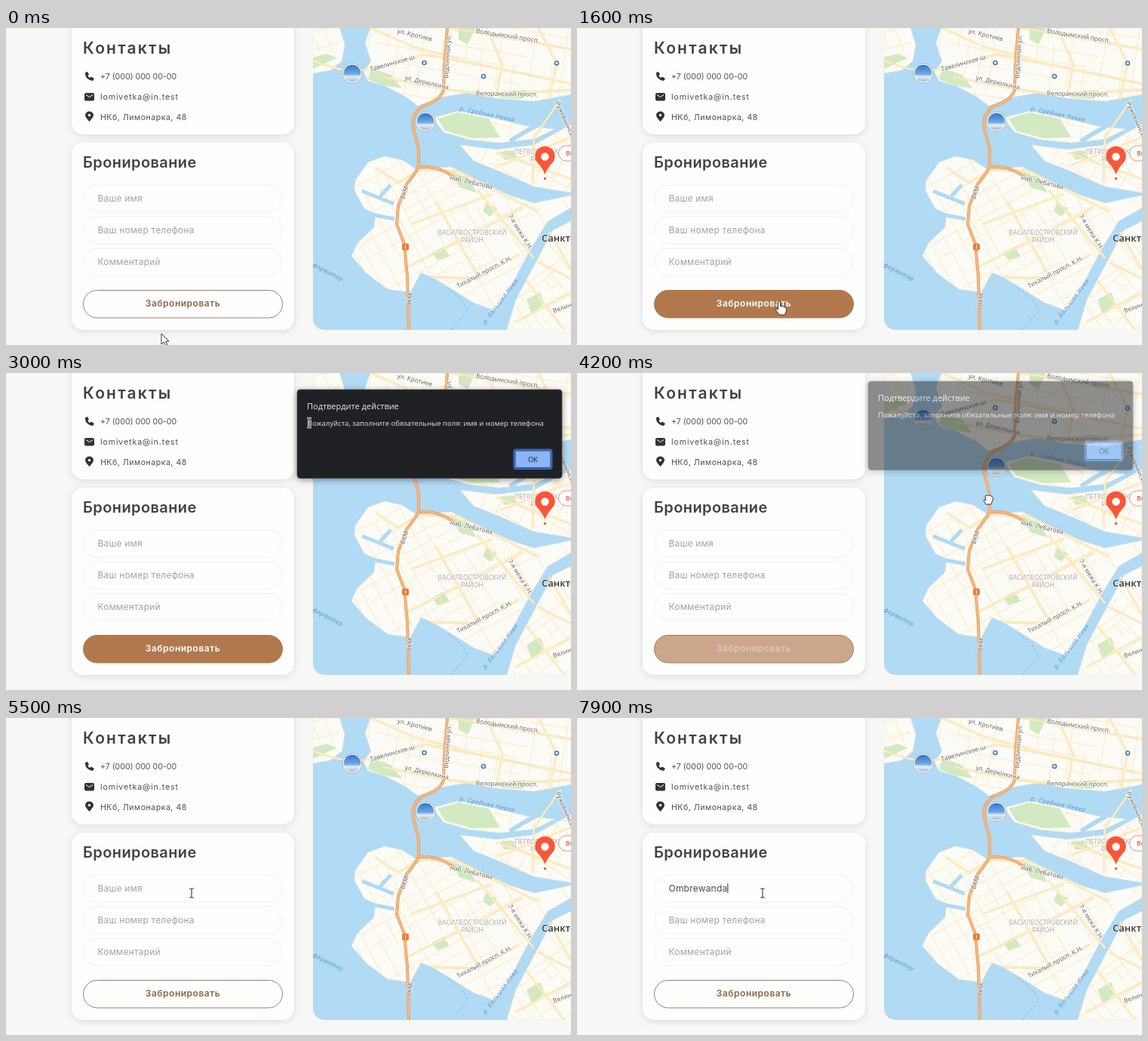
These frames come from a looping animation (749 by 420 pixels, 8000 ms). An HTML page:

```html
<!DOCTYPE html>
<html lang="ru">
<head>
<meta charset="utf-8">
<title>Бронирование</title>
<style>
html, body { margin: 0; width: 100%; height: 100%; overflow: hidden; background: #f7f7f6 }
svg { display: block; width: 749px; height: 420px; font-family: Inter, sans-serif }
.card { fill: #fefefe; filter: drop-shadow(0 2px 5px #0000001c) }
.head { font-size: 20px; font-weight: 600; fill: #444144 }
.info { font-size: 10.6px; fill: #504d50 }
.hint { font-size: 12px; fill: #a5a3a2; letter-spacing: .2px }
.field { fill: #fefefe; stroke: #f1f0f0 }
.map text, .dialog text { font-family: "Open Sans", "Noto Sans", sans-serif }
.map text { font-size: 8.3px; fill: #5f5d59; text-anchor: middle; paint-order: stroke; stroke: #fffc; stroke-width: 1.6px }
.map .river { fill: #5b94c8; font-style: italic; stroke: none; letter-spacing: .5px }
.map .area { fill: #aaa6a6; font-size: 8.5px }
.map .city { fill: #333; font-size: 13px; font-weight: 600; text-anchor: start }
.map .tag { fill: #e8563a; font-weight: 600; text-anchor: start; stroke: none }
</style>
</head>
<body>
<svg viewBox="0 0 749 420">
  <defs>
    <clipPath id="frame"><rect x="407" y="-30" width="380" height="430" rx="15"/></clipPath>
    <linearGradient id="sky" x2="0" y2="1">
      <stop offset="0" stop-color="#2f74cd"/><stop offset=".55" stop-color="#75aae5"/>
      <stop offset=".7" stop-color="#e6edf2"/><stop offset="1" stop-color="#9db8cd"/>
    </linearGradient>
    <g id="photo"><circle r="13" fill="#fff" stroke="#a9b5c0"/><circle r="11.3" fill="url(#sky)"/></g>
    <g id="arrow"><path d="M0 0V14L3.3 11 5.6 16 8 15 5.7 10H10Z" fill="#fff" stroke="#333"/></g>
    <g id="beam"><path d="M-3-6H-1L0-5 1-6H3M0-5V5M-3 6H-1L0 5 1 6H3" fill="none" stroke="#fff" stroke-width="2.6"/>
      <path d="M-3-6H-1L0-5 1-6H3M0-5V5M-3 6H-1L0 5 1 6H3" fill="none" stroke="#444" stroke-width="1.2"/></g>
    <g id="hand"><path d="M-1.5 0Q0-2 1.5 0V6Q3 4.500 4.500 6 6 5.500 7 7 9 6.500 9.500 9V12L7.500 17H0L-5 10Q-4.500 8-1.500 10Z" fill="#fff" stroke="#333"/></g>
    <g id="grab"><path d="M-3 7L-6 2Q-5 0-3 2L-4-4Q-2.500-6-1 -4 0-7 2-4.500 4-6 4.500-3 7-4 6.500 0L4 7Z" fill="#fff" stroke="#333"/></g>
  </defs>

  <g>
    <rect class="card" x="87" y="-30" width="295" height="171" rx="15"/>
    <rect class="card" x="87" y="152" width="295" height="248" rx="15"/>
    <text class="head" x="102" y="34" style="font-size:21px" letter-spacing="2.2">Контакты</text>
    <text class="head" x="102" y="185" letter-spacing=".4">Бронирование</text>
    <path d="M105 59Q104 68 115 70L117 67 113 64.500 111 66Q109 65 108.500 63L110 61.500 108 58Z" fill="#343235"/>
    <rect x="104" y="86" width="13" height="10.500" rx="2" fill="#343235"/>
    <path d="M106 88.500L110.500 91.500 115 88.500" fill="none" stroke="#fff"/>
    <path d="M110.500 124Q105 118 105 115.500A5.500 5 0 0 1 116 115.500Q116 118 110.500 124Z" fill="#343235"/>
    <circle cx="110.500" cy="115.500" r="1.700" fill="#fff"/>
    <text class="info" x="125" y="68">+7 (000) 000 00-00</text>
    <text class="info" x="125" y="95" letter-spacing=".9">lomivetka@in.test</text>
    <text class="info" x="125" y="121.500" letter-spacing=".5">НКб, Лимонарка, 48</text>
    <rect class="field" x="103" y="208" width="263" height="36" rx="18"/>
    <rect class="field" x="103" y="250" width="263" height="36" rx="18"/>
    <rect class="field" x="103" y="292" width="263" height="36" rx="18"/>
    <text class="hint" id="name" x="121.500" y="229.500"></text>
    <path id="caret" stroke="#333"/>
    <text class="hint" x="121.500" y="271.500">Ваш номер телефона</text>
    <text class="hint" x="121.500" y="313.500">Комментарий</text>
    <rect id="button" x="102.500" y="347.500" width="264" height="36.500" rx="18.200"/>
    <text id="label" x="234.500" y="369" text-anchor="middle" font-size="12" letter-spacing=".5" font-weight="600">Забронировать</text>
  </g>

  <g class="map" clip-path="url(#frame)">
    <rect x="407" y="0" width="342" height="400" fill="#b1daf4"/>
    <g id="land"></g>
    <g id="roads" fill="none" stroke-linejoin="round"></g>
    <path d="M585 345Q606 358 612 375L590 400" fill="none" stroke="#7eb0d5" stroke-dasharray="3 3"/>
    <rect x="525" y="285.500" width="9" height="9" rx="2" fill="#f07b32"/>
    <path d="M529.500 287.500V292.500" stroke="#fff"/>
    <g id="names"></g>
    <g fill="#fff" stroke="#487fbb" stroke-width="1.700">
      <circle cx="554.500" cy="46" r="2.500"/><circle cx="633" cy="64" r="2.500"/><circle cx="730" cy="46.500" r="2.500"/>
    </g>
    <use href="#photo" x="459" y="60"/>
    <use href="#photo" x="556" y="124"/>
    <path d="M714.500 194Q711 185 705 179A13.200 13.200 0 1 1 724 179Q718 185 714.500 194Z" fill="#fa5538"/>
    <circle cx="714.500" cy="170.500" r="5.200" fill="#fff"/>
    <circle cx="714.500" cy="199.500" r="2.200" fill="#e5603d" stroke="#fff"/>
    <rect x="732.500" y="156" width="60" height="20" rx="10" fill="#fff" stroke="#e9917c"/>
    <text class="tag" x="742" y="169">Во</text>
  </g>

  <g class="dialog" id="dialog">
    <rect x="386" y="22" width="351" height="117.500" rx="4" fill="#202124" stroke="#45474a" stroke-width=".7" style="filter:drop-shadow(0 2px 4px #0006)"/>
    <text x="399" y="48" font-size="11" fill="#e8eaed">Подтвердите действие</text>
    <text x="399" y="70" font-size="9.540" fill="#e3e5e8">Пожалуйста, заполните обязательные поля: имя и номер телефона</text>
    <rect x="673.500" y="101.500" width="50" height="25.500" rx="3" fill="#8ab4f8" stroke="#346bc5" stroke-width="2"/>
    <rect x="675" y="103" width="47" height="22.500" rx="2" fill="none" stroke="#202124" stroke-width=".8"/>
    <text x="698.500" y="117.500" font-size="9.500" fill="#202124" text-anchor="middle">ОК</text>
  </g>
  <use id="cursor"/>
</svg>
<script>
const $ = id => document.getElementById(id);
const add = (id, html) => $(id).insertAdjacentHTML('beforeend', html);

// Land masses, each with a slightly irregular street grid
let seed = 7;
const rnd = () => (seed = seed * 16807 % 2147483647) / 2147483647;
function isle(id, d, x, y, size, angle, gap) {
  let grid = '';
  for (let p = -size; p < size; p += gap * (.6 + rnd() * .8)) {
    const a = -size * rnd(), b = size * rnd(), bend = rnd() * 8 - 4;
    grid += `M${a} ${p}Q0 ${p + bend} ${b} ${p}`;
  }
  for (let p = -size; p < size; p += gap * (.6 + rnd() * .8))
    grid += `M${p} ${-size * rnd()}L${p + rnd() * 8} ${size * rnd()}`;
  add('land', `<clipPath id="${id}"><path d="${d}"/></clipPath>
    <path d="${d}" fill="#fdfbf6" stroke="#e9ebe4" stroke-width=".7"/>
    <g clip-path="url(#${id})"><path d="${grid}" transform="translate(${x} ${y}) rotate(${angle})"
      fill="none" stroke="#fbeecb" stroke-width="1.2"/></g>`);
}
isle('west', 'M407 0H442L449 22 445 44 430 56 407 60Z', 424, 22, 34, -15, 18);
isle('north', 'M483 0L476 20 484 44 474 58 480 70 503 77 530 91 546 103 575 92 610 86 650 93 700 97 749 88V0Z', 615, 45, 140, 10, 20);
isle('park', 'M566 119L600 110 640 118 690 130 727 134 700 147 655 152 615 148 580 138Z', 640, 130, 90, 15, 26);
isle('east', 'M602 155L650 161 700 155 749 128V218L700 210 655 190 620 176Z', 690, 175, 80, 30, 17);
isle('harbour', 'M502 170L525 175 545 188 590 184 632 205 668 222 700 232 749 222V238L718 256 696 292 682 318 668 345 648 374 620 364 590 345 565 330 550 324 536 350 506 346 478 325 458 302 466 285 488 264 490 246 475 239 462 215 463 202 480 178Z', 605, 260, 145, -28, 18);
isle('south', 'M749 256L725 268 708 300 692 330 676 360 664 400H749Z', 715, 335, 75, -35, 16);

const parks = [
  'M407 39L426 34 438 40 407 54Z', 'M484 53L510 62 525 80 500 76 480 68Z', 'M600 0H622L612 22 600 15Z',
  'M572 120L600 112 640 120 655 145 618 146 582 136Z', 'M650 85L690 82 684 94 655 92Z',
  'M655 164L672 162 678 172 661 175Z', 'M590 190L612 198 624 218 601 211Z', 'M636 232L651 239 642 250 632 243Z',
  'M690 360L708 350 714 365 697 378Z', 'M565 298L580 290 588 302 572 308Z'];
add('land', `<path d="${parks.join('')}" fill="#d2e9c1"/>
  <g fill="none" stroke="#b1daf4"><path d="M472 216L514 233M496 223L510 208M484 247L515 253" stroke-width="5"/>
  <path d="M668 150Q698 130 749 107" stroke-width="6"/></g>`);

const road = (d, color, w) => add('roads', `<path d="${d}" stroke="${color}" stroke-width="${w}"/>`);
const yellow = 'M407 43Q450 62 484 54T555 35L640 51 749 74M484 0L540 25 600 40M500 65L580 81 640 88 749 82'
  + 'M590 0L749 28M637 0L658 48 650 90M706 0L730 47 720 95M548 188L600 190 640 211 705 243M490 185L520 205 548 188'
  + 'M533 316L600 283 685 238M565 330L625 332 680 300M625 215L700 305M570 230L625 327M537 260L645 220M650 165L749 200'
  + 'M735 95L700 145 698 205M655 182L749 145M705 310L749 332M675 390L749 350M720 270L749 320M690 335L740 400';
road(yellow, '#f7dda6', 2.8);
road(yellow, '#fff0c4', 1.7);
const highway = 'M585 0L581 50 580 83Q575 96 552 104 535 116 541 137L547 160V184Q541 195 531 207L520 236 518 260 528 286 532 330 534 400M547 184Q575 182 595 199';
road(highway, '#e39a61', 4);
road(highway, '#f8b77c', 2.6);

const name = (s, x, y, turn = 0, cls = '') =>
  add('names', `<text class="${cls}" transform="translate(${x} ${y}) rotate(${turn})" y="3">${s}</text>`);
name('ул. Кротиев', 542, 9, 14);
name('Володымский просп.', 665, 10, 9);
name('Тавелинское ш.', 513, 46, -16);
name('ул. Дерюлкина', 558, 72, 13);
name('Велоранский просп.', 664, 87, 1);
name('Ведлинная ул.', 585, 38, -86);
name('Ружевнинский', 743, 125, 66);
name('наб. Лебатова', 617, 204, 13);
name('Тихалый просп. К.Н.', 634, 323, -28);
name('7-я межа К.Н.', 682, 270, 58);
name('Велинная', 744, 368, -20);
name('ВКМ', 528, 218, -72);
name('ВКМ', 535, 360, -83);
name('р. Средняя Невка', 638, 114, 12, 'river');
name('р. Большая Нева', 655, 362, -53, 'river');
name('фарватер', 427, 323, 27, 'river');
name('ВАСИЛЕОСТРОВСКИЙ', 618, 271, 0, 'area');
name('РАЙОН', 618, 281, 0, 'area');
name('ПЕТРОГРАДСКИЙ', 710, 164, 0, 'area');
name('РАЙОН', 710, 174, 0, 'area');
name('Санкт-', 710, 280, 0, 'city');

// time, x, y of the pointer
const path = [[0, 206, 405], [300, 206, 405], [1000, 268, 363], [1800, 268, 363], [2000, 416, 94], [2300, 416, 94],
  [2800, 402, 66], [3500, 402, 66], [3900, 698, 114], [4050, 698, 114], [4200, 545, 167], [4500, 520, 176],
  [5300, 246, 232], [8000, 246, 232]];
const typed = 'Ombrewanda';
const clamp = v => Math.max(0, Math.min(1, v));
const ramp = (t, a, b) => clamp((t - a) / (b - a));
const mix = (a, b, p) => `rgb(${a.map((v, i) => Math.round(v + (b[i] - v) * p))})`;
const white = [254, 254, 254], brown = [177, 120, 78], ink = [139, 101, 70];

function pointer(t) {
  const i = path.findIndex(k => k[0] > t), [t0, x0, y0] = path[i - 1], [t1, x1, y1] = path[i];
  const u = ramp(t, t0, t1), p = u * u * (3 - 2 * u);
  return [x0 + (x1 - x0) * p, y0 + (y1 - y0) * p];
}
function shape(x, y, open, t) {
  if (open) return Math.abs(y - 66) < 7 && x < 713 ? 'beam' : 'arrow';
  if (t > 4000 && x > 407) return 'grab';
  if (x > 103 && x < 366 && y > 347 && y < 384) return 'hand';
  return x > 103 && x < 366 && y > 208 && y < 328 ? 'beam' : 'arrow';
}
function draw(t) {
  const [x, y] = pointer(t), open = t >= 1900 && t < 4100;
  $('cursor').setAttribute('href', '#' + shape(x, y, open, t));
  $('cursor').setAttribute('transform', `translate(${x} ${y})`);

  const hide = ramp(t, 4100, 4300);
  $('dialog').setAttribute('opacity', t < 1900 ? 0 : 1 - hide);
  $('dialog').setAttribute('transform', `translate(0 ${-22 * hide})`);

  const hover = ramp(t, 650, 950) - ramp(t, 4080, 4430);
  $('button').setAttribute('fill', mix(white, brown, hover));
  $('button').setAttribute('stroke', mix([157, 127, 104], brown, hover));
  $('label').setAttribute('fill', mix(ink, white, hover));

  const n = Math.max(0, Math.floor((t - 6900) / 100)), box = $('name');
  box.textContent = n ? typed.slice(0, n) : 'Ваше имя';
  box.style.fill = n ? '#4b494a' : '';
  const end = 122 + (n ? box.getComputedTextLength() : 0);
  const lit = t >= 5900 && (n || Math.floor((t - 5900) / 500) % 2 == 0);
  $('caret').setAttribute('d', lit ? `M${end} 219V232` : '');
}
const start = performance.now();
function tick(now) {
  draw(Math.floor(Math.max(0, now - start) % 8000 / 100) * 100);
  requestAnimationFrame(tick);
}
draw(0);
requestAnimationFrame(tick);
</script>
</body>
</html>
```
